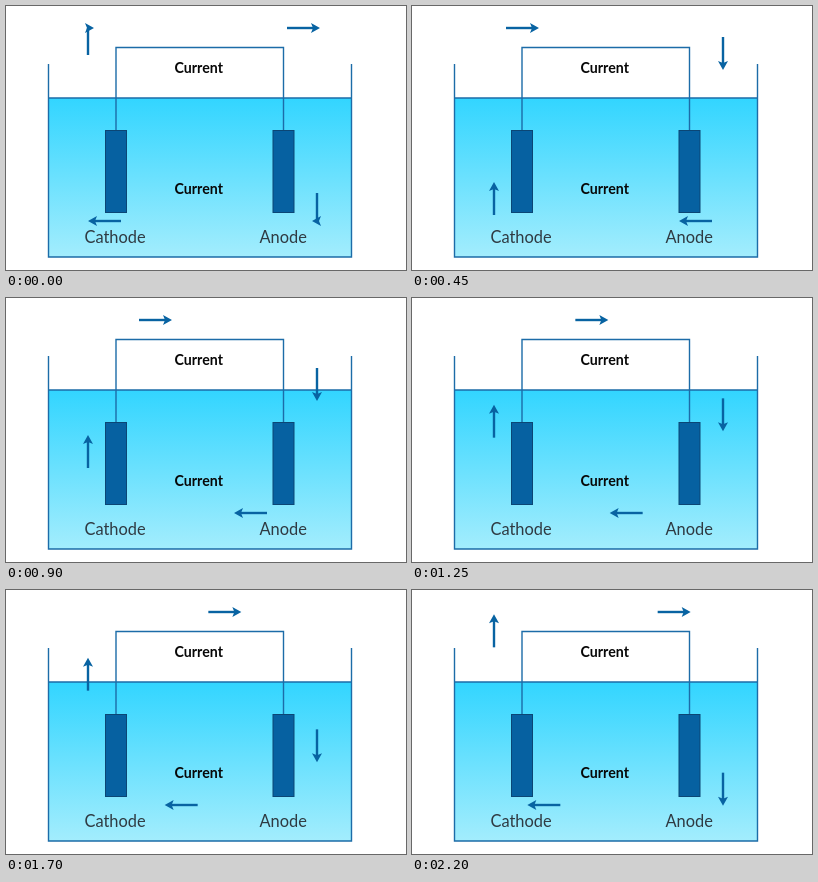
An HTML page for the animation above (2.25 s loop, 400 by 264 pixels).

```html
<!DOCTYPE html>
<html lang="en">
<head>
<meta charset="utf-8">
<title>Electrolytic cell</title>
<style>
  html, body { margin: 0; width: 100%; height: 100%; overflow: hidden; background: #fff; }
  svg { display: block; }
  text { font-family: Lato, "Open Sans", sans-serif; }
  .name { font-size: 16.4px; fill: #2f3a42; }
  .flow { font-size: 14.2px; font-weight: 700; fill: #080808; }
  .line { fill: none; stroke: #1c6ca8; stroke-width: 1.4; }
  .rod { fill: #0661a1; stroke: #0b4675; }
  .shaft { fill: none; stroke: #0863a2; stroke-width: 2.4; }
  .head { fill: #0863a2; }
</style>
</head>
<body>
<svg width="400" height="264" viewBox="0 0 400 264">
  <defs>
    <linearGradient id="water" x2="0" y2="1">
      <stop stop-color="#32d5ff"/>
      <stop offset="1" stop-color="#a3edfd"/>
    </linearGradient>
  </defs>
  <rect x="42.5" y="92" width="303" height="159" fill="url(#water)"/>
  <path class="line" d="M42.5 58V251H345.5V58M42.5 92H345.5M110 125V41.5H277.5V125"/>
  <rect class="rod" x="99.5" y="124.5" width="21" height="82"/>
  <rect class="rod" x="267" y="124.5" width="21" height="82"/>
  <text class="flow" x="168.5" y="66.5">Current</text>
  <text class="flow" x="168.5" y="187.5">Current</text>
  <text class="name" x="78.5" y="236.5">Cathode</text>
  <text class="name" x="253.5" y="236.5">Anode</text>
  <g id="arrows"></g>
</svg>
<script>
  const NS = "http://www.w3.org/2000/svg";
  const ROUTE = "M82 215V22H311V215H82V22";
  const STARTS = [199, 425, 620, 844]; // tip distance along the route
  const LENGTH = 33, STEP = 39 / 9, FRAME = 50, LOOP = 2250;
  const group = document.getElementById("arrows");

  function addPath(className, d) {
    const path = document.createElementNS(NS, "path");
    path.setAttribute("class", className);
    path.setAttribute("d", d);
    return group.appendChild(path);
  }

  const arrows = STARTS.map(start => ({
    start,
    shaft: addPath("shaft", ROUTE),
    head: addPath("head", "M5 0L-4 -5L-2 0L-4 5Z")
  }));

  function place({ start, shaft, head }, frame) {
    const tip = start + frame * STEP;
    shaft.setAttribute("stroke-dasharray", `0 ${tip - LENGTH} ${LENGTH - 6} 2000`);
    // The head turns when its middle passes a corner.
    const a = shaft.getPointAtLength(tip - 5);
    const b = shaft.getPointAtLength(tip - 4.9);
    const angle = Math.round(Math.atan2(b.y - a.y, b.x - a.x) * 2 / Math.PI) * 90;
    head.setAttribute("transform", `translate(${a.x} ${a.y}) rotate(${angle})`);
  }

  function draw() {
    const frame = Math.floor(performance.now() % LOOP / FRAME);
    arrows.forEach(arrow => place(arrow, frame));
    requestAnimationFrame(draw);
  }
  draw();
</script>
</body>
</html>
```
